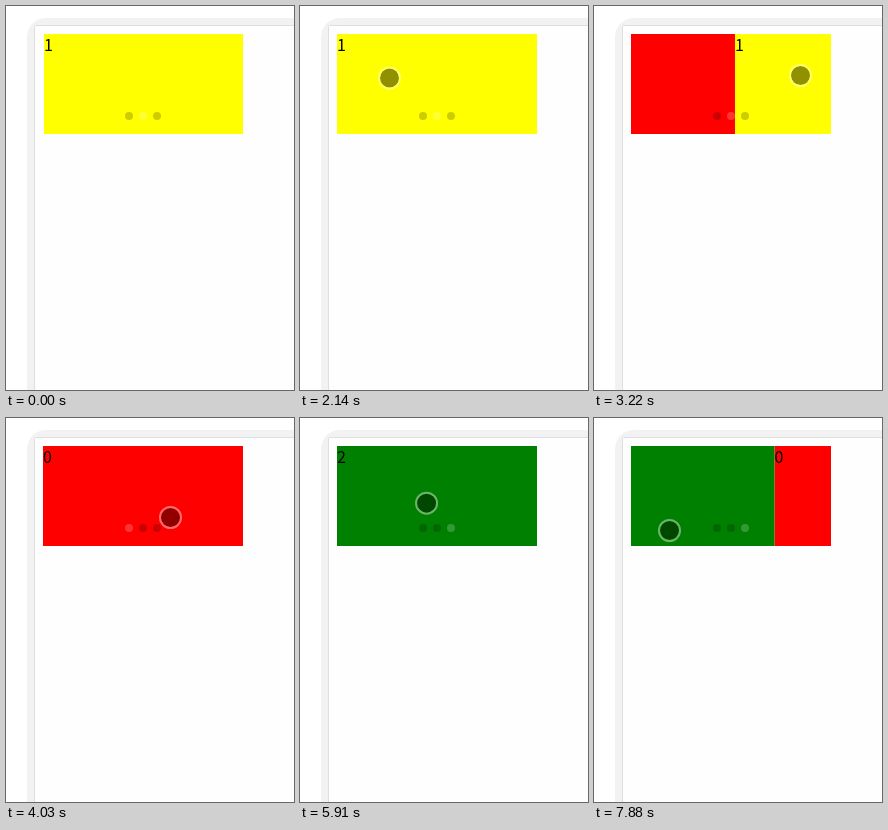
Animation of 288 by 384 pixels, one loop 8 s. Source, as an HTML page:

```html
<!DOCTYPE html>
<html lang="en">
<head>
<meta charset="utf-8">
<title>Swipe carousel</title>
<style>
  html, body { margin: 0; width: 100%; height: 100%; overflow: hidden; background: #fff; }
  svg { display: block; width: 288px; height: 384px; }
  text { font: 16px "Noto Sans CJK SC", "Noto Sans CJK JP", Lato, sans-serif; }
  .dot { fill: #000; fill-opacity: .2; }
  .dot.on { fill: #fff; }
</style>
</head>
<body>
<svg viewBox="0 0 288 384">
  <defs><clipPath id="view"><rect x="37" y="28" width="200" height="100"/></clipPath></defs>
  <rect x="21" y="12" width="400" height="500" rx="19" fill="#f2f2f2"/>
  <rect x="28.5" y="19.5" width="400" height="500" rx="1" fill="#fefefe" stroke="#dedede"/>
  <g clip-path="url(#view)">
    <g class="slide"><rect y="28" width="200" height="100" fill="#f00"/><text y="45">0</text></g>
    <g class="slide"><rect y="28" width="200" height="100" fill="#ff0"/><text y="45">1</text></g>
    <g class="slide"><rect y="28" width="200" height="100" fill="#008000"/><text y="45">2</text></g>
  </g>
  <circle class="dot" cx="123" cy="110" r="4"/>
  <circle class="dot" cx="137" cy="110" r="4"/>
  <circle class="dot" cx="151" cy="110" r="4"/>
  <g id="touch">
    <circle r="9.5" fill="#000" fill-opacity=".435"/>
    <circle r="10.5" fill="none" stroke="#fff" stroke-opacity=".42" stroke-width="2"/>
  </g>
</svg>
<script>
const LOOP = 8000, LEFT = 37, WIDTH = 200, SLACK = 13, STEP = 135, SETTLE = 75;
const SHOW = 550;

// The picture refreshes every STEP ms, counted from the latest of these times
const bursts = [0, SHOW, 2140, 4760, 6280, 7340];

// Turning points of the pointer: time, x, y
const path = [
  [SHOW, 268.5, 225.5], [1540, 91.5, 88.5], [1840, 89.5, 72], [2140, 89.5, 72],
  [3220, 206.5, 69.5], [3610, 222, 120], [4030, 164.5, 99.5], [4330, 114.5, 79.5],
  [4650, 114.5, 79], [5165, 230.5, 77.5], [5450, 205, 95], [5910, 122.5, 84.5],
  [6280, 122.5, 86], [6955, 189.5, 206.5], [7225, 160, 128], [7475, 145, 112],
  [7880, 75.5, 112.5]
];

// Swipes: press and release time, slide before and after
const swipes = [
  { down: 2140, up: 3340, from: 1, to: 0 },
  { down: 4650, up: 5200, from: 0, to: 2 },
  { down: 6280, up: 6600, from: 2, to: 2 },
  { down: 7475, up: LOOP, from: 2, to: 2 }
];

const slides = document.querySelectorAll('.slide');
const dots = document.querySelectorAll('.dot');
const touch = document.getElementById('touch');

const slope = (i, c) => path[i] && path[i + 1]
  ? (path[i + 1][c] - path[i][c]) / (path[i + 1][0] - path[i][0]) : 0;

// Smooth through a point, but at rest where the direction turns
function tangent(i, c) {
  const a = slope(i - 1, c), b = slope(i, c);
  return a * b > 0 ? 2 * a * b / (a + b) : 0;
}

function pointer(t) {
  if (t <= path[0][0]) return path[0].slice(1);
  const i = path.findLastIndex(p => p[0] <= t);
  if (i === path.length - 1) return path[i].slice(1);
  const span = path[i + 1][0] - path[i][0];
  const k = (t - path[i][0]) / span, j = 1 - k;
  return [1, 2].map(c =>
    j * j * (1 + 2 * k) * path[i][c] + k * k * (1 + 2 * j) * path[i + 1][c] +
    k * j * span * (j * tangent(i, c) - k * tangent(i + 1, c)));
}

function dragShift(s, t) {
  const d = pointer(t)[0] - pointer(s.down)[0];
  return Math.sign(d) * Math.max(0, Math.abs(d) - SLACK);
}

function carousel(t) {
  const s = swipes.findLast(s => t >= s.down);
  if (!s) return { base: 1, active: 1, shift: Math.max(0, 1 - t / 270) };
  if (t < s.up) return { base: s.from, active: s.from, shift: dragShift(s, t) };
  const rest = s.from === s.to ? 0 : WIDTH;
  const gap = (dragShift(s, s.up) - rest) * Math.exp((s.up - t) / SETTLE);
  return { base: s.from, active: s.to, shift: rest + (Math.abs(gap) < .6 ? 0 : gap) };
}

function draw(t) {
  const { base, active, shift } = carousel(t);
  slides.forEach((el, i) => {
    const side = (i - base + 4) % 3 - 1;
    el.setAttribute('transform', `translate(${LEFT + shift + side * WIDTH} 0)`);
    el.style.display = side && t < SHOW ? 'none' : '';
  });
  dots.forEach((el, i) => el.classList.toggle('on', i === active));
  touch.style.display = t < SHOW ? 'none' : '';
  touch.setAttribute('transform', `translate(${pointer(t).join(' ')})`);
}

const start = performance.now();
function frame(now) {
  const t = Math.max(0, now - start) % LOOP;
  const burst = bursts.findLast(b => b <= t);
  draw(t - (t - burst) % STEP);
  requestAnimationFrame(frame);
}
draw(0);
requestAnimationFrame(frame);
</script>
</body>
</html>
```
